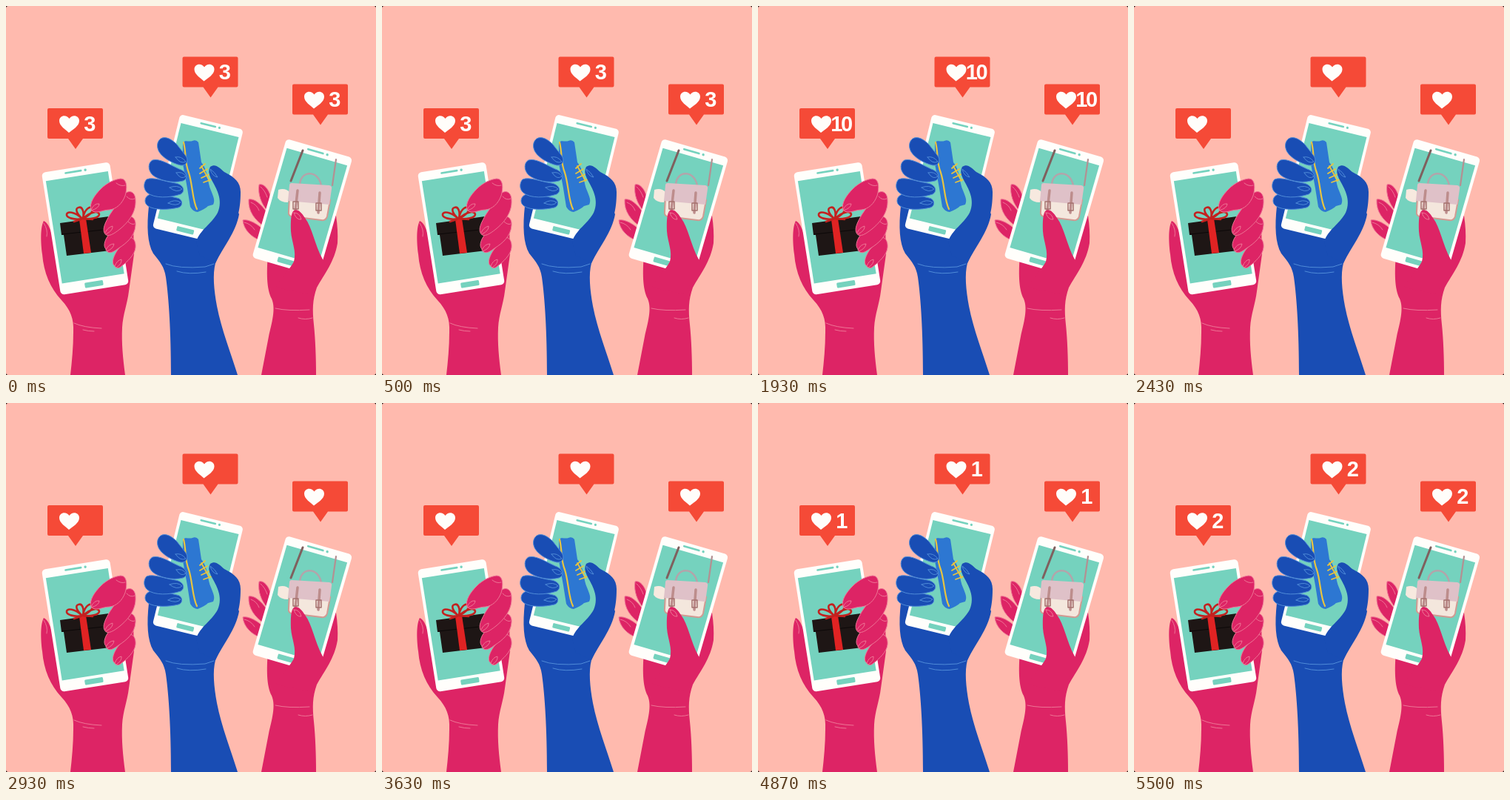
An HTML page for the animation above (5.53 s loop, 500x498 px).

```html
<!DOCTYPE html>
<html lang="en">
<head>
<meta charset="utf-8">
<title>Counting likes</title>
<style>
html, body { margin: 0; width: 100%; height: 100%; overflow: hidden; background: #000; }
svg { display: block; width: 100vw; height: 100vh; }
.pink { fill: #dd2465; }
.blue { fill: #194db4; }
.pink.finger, .pinkLine { stroke: #ee7595; stroke-width: 1; }
.blue.finger, .blueLine { stroke: #4f8bd8; stroke-width: 1; }
.pinkLine, .blueLine, .line { fill: none; stroke-linecap: round; stroke-linejoin: round; }
.count {
  font: bold 29px "Liberation Sans", sans-serif;
  letter-spacing: -2.5px;
  text-anchor: middle;
  fill: #fffdfa;
}
</style>
</head>
<body>
<svg viewBox="0 0 500 498" preserveAspectRatio="none">
  <defs>
    <g id="phone">
      <rect width="93" height="167" rx="5" fill="#fffefb"/>
      <rect x="4" y="12" width="85" height="140" fill="#75d2be"/>
      <path class="line" d="M32 5.5H53" stroke="#75d2be" stroke-width="2.6"/>
      <circle cx="59" cy="5.5" r="1.7" fill="#75d2be"/>
      <rect x="34" y="156" width="25" height="7" rx="1.5" fill="#75d2be"/>
    </g>
    <g id="bubble">
      <path d="M2 0H73Q75 0 75 2V39Q75 41 73 41H48L38 55 28 41H2Q0 41 0 39V2Q0 0 2 0Z" fill="#f54a37"/>
      <path d="M29 33C25 29 16 24 16 17C16 9 26 8 29.500 14C33 8 43 9 43 17C43 24 34 29 29 33Z" fill="#fffdfa"/>
    </g>
  </defs>

  <rect width="500" height="498" rx="3" fill="#ffbaae"/>

  <!-- left hand with gift -->
  <path class="pink" d="M51 290C46 299 47 320 49 335C51 360 60 381 75 397C87 410 92 422 91 440C91 460 89 480 87 498H161C158 475 156 455 157 434C158 416 164 402 166 385L173 335 172 295 140 280 80 370C72 345 66 327 64 315C61 305 58 293 51 290Z"/>
  <use href="#phone" transform="translate(48 225) rotate(-9)"/>
  <path d="M73 293 139 284 142 302 140 303 141 330 82 337 78 309 75 309Z" fill="#1e1615"/>
  <path class="line" d="M76 308 141 301" stroke="#0c0808"/>
  <path d="M99 288 108 287 115 333 105 334Z" fill="#e02323"/>
  <g class="line" stroke="#c3211f" stroke-width="2.600">
    <path d="M103 287C92 277 83 277 82 281C81 286 93 289 103 287C95 280 93 273 98 272C103 270 106 278 104 286C106 275 113 269 117 273C119 278 110 284 104 287C115 277 125 276 126 281C126 286 114 288 104 287"/>
    <path d="M101 288 92 291M106 287 117 288"/>
  </g>
  <g class="pink finger">
    <path d="M146 350C142 346 146 336 151 329L163 314C170 309 176 316 175 326C174 336 164 345 155 352Q150 356 146 350Z"/>
    <path d="M135 328C130 323 135 312 142 305L160 287C168 280 176 286 175 296C174 311 163 320 152 327C143 334 137 335 135 328Z"/>
    <path d="M133 306C130 300 135 291 140 282L157 257C165 246 175 250 175 262C176 279 165 292 154 301C144 309 136 313 133 306Z"/>
    <path d="M115 275C112 266 120 255 128 247C137 238 147 234 155 233C164 233 164 246 161 256C157 267 149 274 140 275C130 275 121 282 115 275Z"/>
  </g>
  <path class="pinkLine" d="M115 275Q119 266 126 267Q126 273 115 276M134 306Q137 299 144 297Q145 303 135 308M135 329Q139 321 146 321Q145 328 136 331M147 351Q150 343 156 342Q157 348 149 353M149 239Q155 244 161 242M163 257Q168 263 174 260M165 291Q170 296 174 294M92 428Q105 434 129 435M104 437Q111 439 119 439M51 293Q57 302 55 311"/>

  <!-- middle hand with shoe -->
  <path class="blue" d="M193 270C190 298 191 320 199 334C208 345 214 352 216 366C220 394 223 440 223 498H313C304 469 291 436 285 405C281 383 279 362 283 347C293 326 311 305 315 281L300 250 220 255Z"/>
  <use href="#phone" transform="translate(235.500 146) rotate(13.800) scale(.945)"/>
  <path d="M239 184C243 180 247 184 252 182Q257 180 260 184L264 211C273 221 272 239 277 249C280 257 283 262 280 268L273 270Q269 274 259 278Q253 278 249 271L245 246 239 213Z" fill="#2d77d2"/>
  <path class="line" d="M240 184C244 201 241 210 247 225C252 240 252 263 258 274" stroke="#e8c43f" stroke-width="2.200"/>
  <path class="line" d="M262 219 269 213M262 226 272 220M264 232 275 227M267 238 278 234M264 216 275 236" stroke="#e8c43f" stroke-width="1.800"/>
  <g class="blue finger">
    <path d="M193 255C200 249 217 256 231 259C239 260 240 270 233 272C220 275 201 276 192 270C186 266 187 258 193 255Z"/>
    <path d="M190 234C199 230 214 237 229 239C240 241 243 250 236 254C222 259 200 260 191 252C185 247 186 238 190 234Z"/>
    <path d="M198 208C207 205 221 214 234 220C246 224 246 234 239 236C225 240 206 235 198 228C191 221 192 211 198 208Z"/>
    <path d="M209 179C216 175 224 180 231 187L242 201C248 208 244 216 236 215C224 212 212 205 207 197C203 190 204 183 209 179Z"/>
  </g>
  <path class="blue" d="M276 217C283 212 288 218 295 224C309 231 317 238 317 251C317 277 312 291 302 308L283 347 262 337 257 318C262 302 278 294 286 279C294 261 284 246 277 233Q272 223 276 217Z"/>
  <path class="blueLine" d="M276 220Q282 224 286 231Q279 230 276 221M229 204Q237 202 243 210Q236 214 229 204M230 225Q239 223 243 230Q236 235 230 225M221 245Q232 241 238 247Q231 253 221 245M219 266Q228 260 236 265Q231 271 219 266M216 348Q233 355 269 352L281 348M231 358Q247 363 270 359"/>

  <!-- right hand with bag -->
  <g class="pink finger">
    <path d="M342 241C348 239 355 247 357 256L353 276C345 267 340 254 342 241Z"/>
    <path d="M328 261C337 259 348 271 354 281L348 297C337 289 327 278 328 261Z"/>
    <path d="M320 289C328 287 341 295 348 302L343 316C332 312 321 302 320 289Z"/>
  </g>
  <path class="pink" d="M354 335C352 359 352 382 359 395C365 409 359 428 355 446L345 498H419C419 475 418 449 416 430C414 410 414 397 420 380C430 362 444 345 448 320Q449 303 446 283L420 290 380 330Z"/>
  <path class="pinkLine" d="M344 244Q350 249 353 258M331 265Q339 268 342 276M322 292Q331 294 336 302"/>
  <use href="#phone" transform="translate(379 179) rotate(16.200)"/>
  <path class="line" d="M401 195 385 236" stroke="#7f605e" stroke-width="3"/>
  <path class="line" d="M446 207 441 242" stroke="#b39092" stroke-width="2.200"/>
  <path class="line" d="M397 241C398 221 423 221 426 243" stroke="#b3a4aa" stroke-width="2.500"/>
  <path d="M368 248Q378 245 384 252L381 265Q371 265 367 259Z" fill="#f7e9df"/>
  <path d="M383 258 438 262 434 284Q432 290 426 289L386 284Q381 283 382 277Z" fill="#f4e7dd" stroke="#d29a92" stroke-width="2"/>
  <path d="M386 239 437 242Q441 243 440 247L437 268 381 263 383 242Q383 239 386 239Z" fill="#dfc1c8"/>
  <path class="line" d="M394 249 391 276M424 252 422 279" stroke="#bd8d8c" stroke-width="3.500"/>
  <path class="line" d="M388 264h7v10h-7zM419 266h7v10h-7z" stroke="#a5716f" stroke-width="1.500"/>
  <path class="pink" d="M388 277C393 272 399 278 404 286C414 299 417 322 428 342L436 350 407 389 365 380C371 365 383 357 389 345C393 331 386 319 385 304Q384 283 388 277Z"/>
  <path class="pinkLine" d="M389 279Q397 279 399 288Q392 289 389 279M364 408Q381 412 410 410M395 421Q404 424 414 421"/>

  <g transform="translate(56 138)"><use href="#bubble"/><text class="count" x="56" y="30.500"></text></g>
  <g transform="translate(238.500 68.500)"><use href="#bubble"/><text class="count" x="56" y="30.500"></text></g>
  <g transform="translate(387 105.500)"><use href="#bubble"/><text class="count" x="56" y="30.500"></text></g>
</svg>
<script>
const LOOP = 5530;
const HOLD = 567; // how long each number stays
const FIRST = LOOP - 2 * HOLD; // "1" appears, so "3" falls on the loop point
const values = ["1", "2", "3", "4", "5", "10"];
const counts = document.querySelectorAll(".count");
const start = performance.now();

function draw() {
  const t = (performance.now() - start + LOOP - FIRST) % LOOP;
  const value = values[Math.floor(t / HOLD)] || "";
  for (const el of counts) if (el.textContent !== value) el.textContent = value;
  requestAnimationFrame(draw);
}
draw();
</script>
</body>
</html>
```
